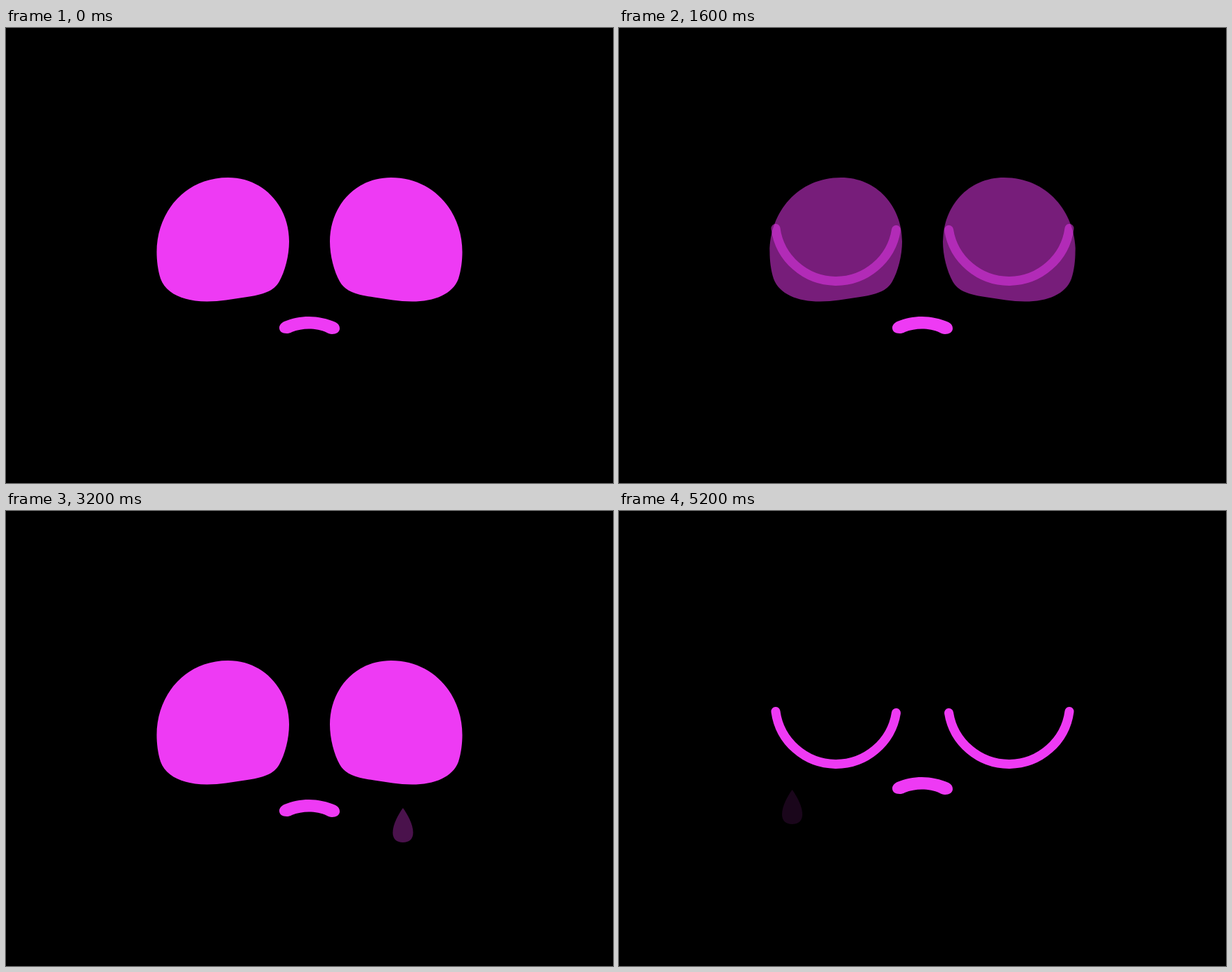
Write an HTML page that moves like this. It is 864x648 px and loops after 5280 ms.

```html
<!DOCTYPE html>
<html lang="en">
<head>
<meta charset="utf-8">
<title>Sad face</title>
<style>
  html, body { margin: 0; width: 100%; height: 100%; overflow: hidden; background: #000; }
  svg { display: block; width: 100vw; height: 100vh; }
</style>
</head>
<body>
<svg viewBox="0 0 864 648">
  <defs>
    <path id="eye" d="M316 213C367 213 403 254 403 304C403 324 397 347 389 361C382 374 367 380 340 383.5C322 386 305 389.5 286 389.5C254 389.5 228 379 220 357C216 345 214.5 330 214.5 319C214.5 262 255 213 316 213Z"/>
    <path id="lid" d="M223 285.5A86.7 86.7 0 0 0 394.5 287.5" fill="none" stroke="#ee3af4" stroke-width="13" stroke-linecap="round"/>
    <path id="drop" d="M0 0C6 8 14.5 23 14.5 35C14.5 44 9 49 0 49C-9 49 -14.5 44 -14.5 35C-14.5 23 -6 8 0 0Z"/>
  </defs>
  <rect width="864" height="648"/>
  <g fill="#ee3af4">
    <use id="tearR" href="#drop"/>
    <use id="tearL" href="#drop"/>
    <g id="open">
      <use href="#eye"/>
      <use href="#eye" transform="matrix(-1 0 0 1 864 0)"/>
    </g>
    <g id="shut">
      <use href="#lid"/>
      <use href="#lid" transform="matrix(-1 0 0 1 864 0)"/>
    </g>
    <path id="mouth" d="M389 427C389 423 392 420 396 418C407 413.5 419 411 431 411C444 411 458 414 469 419C473 421 475 424 475 428C475 433 470 436 464 436C461 436 458.5 435 456 433.5C449 430 440 428.5 431 428.5C423 428.5 414 430 407 433C404.5 434.5 402 435 399.5 435C393 435 389 432 389 427Z"/>
  </g>
</svg>
<script>
const LOOP = 5280, STEP = 80;
const BLINKS = [800, 1600], SAD_START = 3840;
const $ = id => document.getElementById(id);
const clamp = v => Math.min(1, Math.max(0, v));

// Cubic bezier (0, 0, 0.2, 1), solved by bisection
function easeOut(x) {
  let lo = 0, hi = 1;
  for (let i = 0; i < 24; i++) {
    const u = (lo + hi) / 2;
    if (0.6 * (1 - u) * u * u + u * u * u < x) lo = u; else hi = u;
  }
  return lo * lo * (3 - 2 * lo);
}

// 0 = open, 1 = closed, 0.5 while cross-fading
function closure(t) {
  if (t >= SAD_START) return 1;
  for (const b of BLINKS) {
    const d = t - b;
    if (d >= 0 && d < 320) return d >= 80 && d < 240 ? 1 : 0.5;
  }
  return 0;
}

function drawTear(el, t, { start, x, y, fall, count, tail }) {
  const k = (t - start) / STEP;
  const visible = k >= 0 && k < count;
  const alpha = Math.min(0.31 * (k + 1), tail + 0.31 * (count - 1 - k));
  el.setAttribute('opacity', visible ? clamp(alpha) : 0);
  el.setAttribute('transform', `translate(${x} ${y + fall * k})`);
}

const RIGHT = { start: 2640, x: 565, y: 381, fall: 6, count: 8, tail: 0.31 };
const LEFT = { start: 4560, x: 246.5, y: 333, fall: 8, count: 9, tail: 0.11 };

function draw(now) {
  const t = Math.floor((now % LOOP) / STEP) * STEP;
  const c = closure(t);
  $('open').setAttribute('opacity', 1 - c);
  $('shut').setAttribute('opacity', c);
  const lift = 32 * easeOut(clamp((t - SAD_START + STEP) / 640));
  $('mouth').setAttribute('transform', `translate(0 ${-lift})`);
  drawTear($('tearR'), t, RIGHT);
  drawTear($('tearL'), t, LEFT);
}

const t0 = performance.now();
function tick() {
  draw(performance.now() - t0);
  requestAnimationFrame(tick);
}
tick();
</script>
</body>
</html>
```
